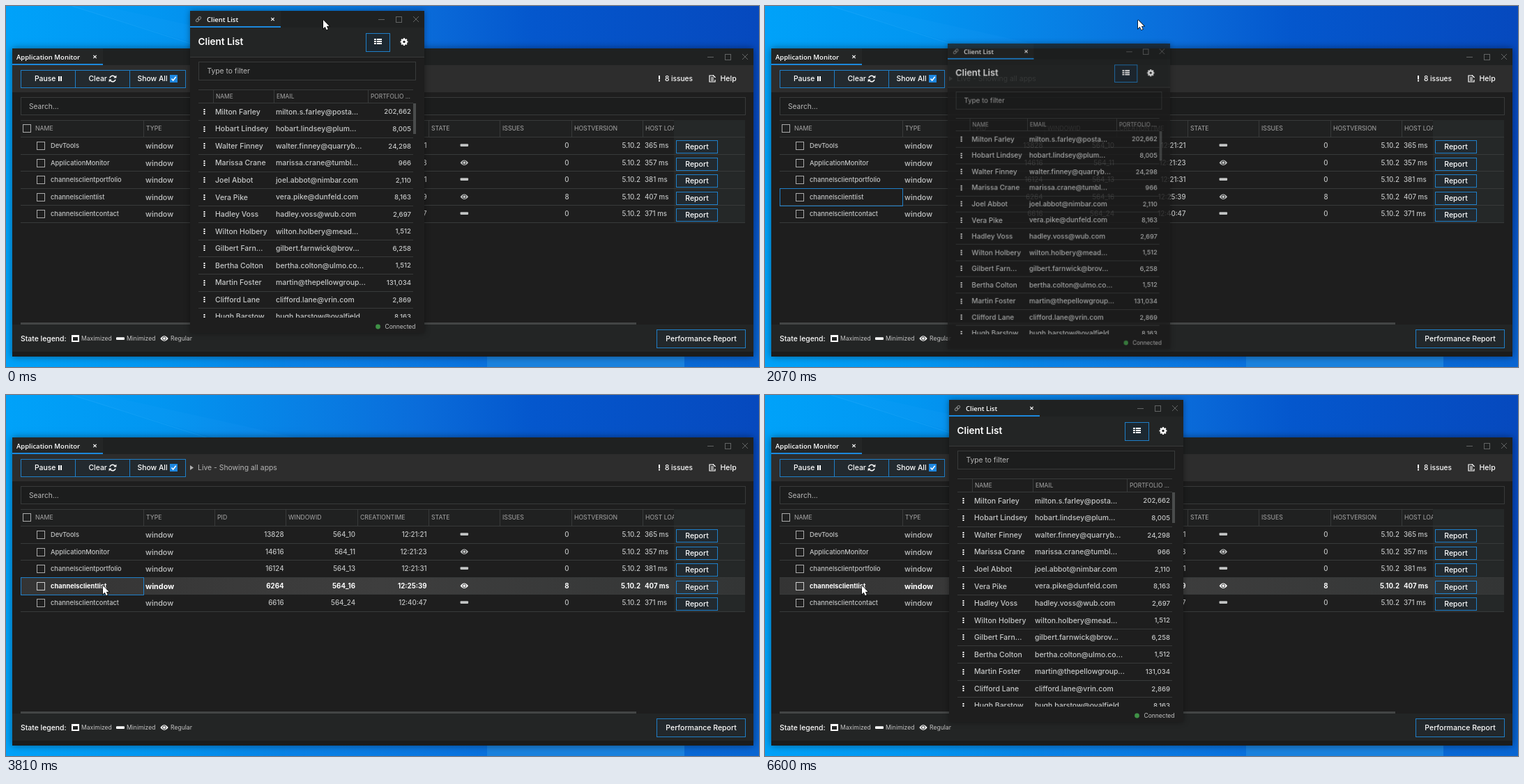
These frames come from a looping animation (1080x519 px, 7 s). An HTML page with a canvas:

```html
<!DOCTYPE html>
<html lang="en">
<head>
<meta charset="utf-8">
<title>Application Monitor</title>
<style>
  html, body { margin: 0; height: 100%; overflow: hidden; background: #0878dc; }
  canvas { display: block; }
</style>
</head>
<body>
<canvas id="stage" width="1080" height="519"></canvas>
<script>
const W = 1080, H = 519, LOOP = 7000;
const BLUE = '#1f7fc8', LINE = '#383a3a', BODY = '#1e1e1e', BAR = '#232525';
const UI = 'Inter, sans-serif', TAB = '"Open Sans", sans-serif';
const stage = document.getElementById('stage').getContext('2d');
let g = stage;

const clamp = v => Math.max(0, Math.min(1, v));

// ---- drawing helpers ----
function fill(x, y, w, h, color) {
  g.fillStyle = color;
  g.fillRect(x, y, w, h);
}
function box(x, y, w, h, color, bg) {
  if (bg) fill(x, y, w, h, bg);
  g.strokeStyle = color;
  g.lineWidth = 1;
  g.strokeRect(x + .5, y + .5, w - 1, h - 1);
}
function text(s, x, y, size, color = '#fff', weight = 400, align = 'left', family = UI) {
  g.font = `${weight} ${size}px ${family}`;
  g.textAlign = align;
  g.fillStyle = color;
  g.fillText(s, x, y + size * .36);
}
function path(points, color, width) {
  g.beginPath();
  points.forEach(([x, y]) => g.lineTo(x, y));
  if (width) {
    g.strokeStyle = color;
    g.lineWidth = width;
    g.stroke();
  } else {
    g.closePath();
    g.fillStyle = color;
    g.fill();
  }
}
function disc(x, y, r, color) {
  g.beginPath();
  g.arc(x, y, r, 0, 7);
  g.fillStyle = color;
  g.fill();
}
function arc(x, y, r, from, to, color, width) {
  g.beginPath();
  g.arc(x, y, r, from, to);
  g.strokeStyle = color;
  g.lineWidth = width;
  g.stroke();
}
function cross(x, y, r, color, width = 1) {
  path([[x - r, y - r], [x + r, y + r]], color, width);
  path([[x + r, y - r], [x - r, y + r]], color, width);
}
function pill(x, y, w, color) {
  g.beginPath();
  g.roundRect(x - w / 2, y - 1.7, w, 3.6, 1);
  g.fillStyle = color;
  g.fill();
}
function eye(x, y, color, pupil) {
  g.beginPath();
  g.moveTo(x - 5.7, y);
  g.quadraticCurveTo(x, y - 7.6, x + 5.7, y);
  g.quadraticCurveTo(x, y + 7.6, x - 5.7, y);
  g.fillStyle = color;
  g.fill();
  arc(x, y, 2.4, 0, 7, pupil, 1);
}
function layer(w, h, draw) {
  const c = document.createElement('canvas');
  c.width = w;
  c.height = h;
  g = c.getContext('2d');
  draw();
  g = stage;
  return c;
}
function titleBar(x, y, w, tabWidth, label, labelX) {
  fill(x, y, w, 24, '#1f2121');
  fill(x, y, tabWidth, 22, '#242626');
  fill(x, y + 22, tabWidth, 2, '#1c88dc');
  text(label, labelX, y + 12.5, 9.5, '#fff', 600, 'left', TAB);
  cross(x + tabWidth - 11.5, y + 12, 2.2, '#fff', 1.1);
  const r = x + w;
  fill(r - 66, y + 12, 9, 1, '#626464');
  box(r - 41, y + 8, 9, 9, '#626464');
  cross(r - 12, y + 12, 4, '#626464');
}

// ---- desktop ----
function drawDesktop() {
  const sky = g.createLinearGradient(0, 0, W, 0);
  [[0, '#00a2f9'], [.2, '#0296f1'], [.4, '#087fe4'], [.55, '#0a6cda'], [.7, '#0457cd'], [1, '#0649be']]
    .forEach(([at, c]) => sky.addColorStop(at, c));
  fill(0, 0, W, H, sky);
  path([[90, 0], [140, 0], [420, 62], [300, 62]], 'rgba(60,170,255,.07)');
  path([[95, 0], [290, 62]], 'rgba(90,190,255,.16)', 1);
  const glow = g.createLinearGradient(0, 200, 0, H);
  glow.addColorStop(0, 'rgba(10,130,232,0)');
  glow.addColorStop(1, 'rgba(10,130,232,.5)');
  fill(400, 200, W - 400, H - 200, glow);
  fill(690, 490, 283, 29, '#1a82de');
}

// ---- monitor window ----
const dividers = [197, 299, 401, 504, 606, 708, 811, 913];
const heads = ['TYPE', 'PID', 'WINDOWID', 'CREATIONTIME', 'STATE', 'ISSUES', 'HOSTVERSION', 'HOST LOA'];
const apps = [
  ['DevTools', '13828', '564_10', '12:21:21', 0, '365 ms'],
  ['ApplicationMonitor', '14616', '564_11', '12:21:23', 0, '357 ms'],
  ['channelsclientportfolio', '16124', '564_13', '12:21:31', 0, '381 ms'],
  ['channelsclientlist', '6264', '564_16', '12:25:39', 8, '407 ms'],
  ['channelsclientcontact', '6616', '564_24', '12:40:47', 0, '371 ms']
];
const TOP = 188, STEP = 24.6;

function drawMonitor() {
  g.shadowColor = 'rgba(0,0,0,.45)';
  g.shadowBlur = 10;
  fill(9, 61, 1063, 443, BODY);
  g.shadowBlur = 0;
  titleBar(9, 61, 1063, 130, 'Application Monitor', 15);

  fill(9, 85, 1063, 39, '#2d2d2d');
  box(21, 92, 237, 26, BLUE, '#232a2f');
  fill(99, 92, 1, 26, BLUE);
  fill(177, 92, 1, 26, BLUE);
  text('Pause', 41, 104.5, 10.4, '#fff', 500);
  fill(75, 101, 2, 7, '#fff');
  fill(78, 101, 2, 7, '#fff');
  text('Clear', 118.5, 104.5, 10.4, '#fff', 500);
  arc(153, 104.5, 4.2, 3.4, 5.9, '#fff', 1.5);
  arc(153, 104.5, 4.2, .3, 2.8, '#fff', 1.5);
  path([[158.4, 99.5], [158.4, 103.6], [154.4, 103.6]], '#fff');
  path([[147.6, 109.5], [147.6, 105.4], [151.6, 105.4]], '#fff');
  text('Show All', 188.5, 104.5, 10.4, '#fff', 500);
  fill(235, 99, 11, 11, '#1d86df');
  path([[237.5, 104.5], [239.7, 107], [243.7, 101.8]], '#fff', 1.5);
  path([[264, 101], [269, 104.5], [264, 108]], '#b0b0b0');
  text('Live - Showing all apps', 275, 104.5, 10.4, '#b5b5b5');
  fill(936, 100, 2, 5.5, '#fff');
  fill(936, 106.5, 2, 2, '#fff');
  text('8 issues', 945, 104.5, 10.1, '#fff', 500);
  path([[1015, 100], [1009, 100], [1009, 109], [1017, 109], [1017, 106]], '#fff', 1.2);
  path([[1014, 99.5], [1017.5, 103]], '#fff', 1.2);
  [102.5, 104.5, 106.5].forEach(y => fill(1011, y, 4, 1, '#fff'));
  text('Help', 1024.5, 104.5, 10.5, '#fff', 500);

  box(21, 131, 1040, 26, LINE, '#1c1d1d');
  text('Search...', 33, 144.5, 10.2, '#b8b8b8');

  fill(21, 164, 1039, 1, LINE);
  fill(21, 165, 1039, 23, '#202121');
  box(24, 170, 12, 12, '#aaa');
  text('NAME', 42, 175.5, 8.7, '#a8a8a8');
  dividers.forEach((x, i) => {
    fill(x, 165, 1, 23, LINE);
    text(heads[i], x + 4, 175.5, 8.7, '#a8a8a8');
  });
  fill(958, 164, 102, 148, '#252828');

  fill(21, 455, 883, 3, '#434545');
  fill(9, 458, 1063, 39, BAR);
  fill(9, 497, 1063, 7, '#1b1c1c');
  text('State legend:', 21, 478, 10.4, '#fff', 500);
  box(94, 473, 11, 10, '#fff');
  g.lineWidth = 2;
  g.strokeRect(95, 474, 9, 8);
  fill(94, 473, 11, 3, '#fff');
  text('Maximized', 108, 478, 8.6, '#c4c4c4');
  pill(164, 478, 12, '#fff');
  text('Minimized', 173, 478, 8.6, '#c4c4c4');
  eye(227, 478, '#fff', BAR);
  text('Regular', 236, 478, 8.6, '#c4c4c4');
  box(933, 465, 128, 27, BLUE, '#22282c');
  text('Performance Report', 997, 478, 10.5, '#fff', 500, 'center');
}

function drawRows(t, hovered) {
  apps.forEach(([name, pid, id, time, issues, load], i) => {
    const y = Math.round(TOP + i * STEP), mid = y + 13, hot = i === hovered;
    const color = hot ? '#fff' : '#c2c4c4', weight = hot ? 700 : 500;
    if (hot) {
      const glow = g.createLinearGradient(21, 0, 1060, 0);
      glow.addColorStop(0, '#343434');
      glow.addColorStop(.5, '#3e3e3e');
      glow.addColorStop(1, '#333535');
      fill(21, y, 1039, 25, glow);
    }
    box(44, mid - 6, 12, 12, hot ? '#ccc' : '#aaa');
    text(name, 64, mid - .5, 9.3, color, weight);
    text('window', 200, mid, 10.8, color, weight);
    const right = (s, x) => text(s, x, mid, 9.7, color, weight, 'right');
    right(pid, 398.5);
    right(id, 501);
    right(time, 603.5);
    right(issues, 807.5);
    right('5.10.2', 910);
    text(load, 916, mid, 9.7, color, weight);
    const regular = i === 1 || i === 3 && (t < 4140 || t >= 6600);
    if (regular) eye(657.3, mid - .7, color, hot ? '#333' : BODY);
    else pill(657.3, mid - 1, 11.5, color);
    fill(21, y, 1039, 1, LINE);
    box(961, y + 5, 60, 19, BLUE, hot ? '#2b343a' : '#222a30');
    text('Report', 991, mid + 1, 10.5, '#fff', 500, 'center');
  });
  fill(21, 311, 1039, 1, LINE);
  if (t >= 2050 && t < 4600) box(21, 262, 177, 26, BLUE);

  const tint = clamp((t - 4440) / 120) * clamp((4850 - t) / 60);
  if (tint > 0) {
    const shade = `rgba(40,120,200,${.4 * tint})`;
    fill(25, 171, 10, 10, shade);
    fill(45, 270, 10, 10, shade);
    fill(962, 268, 58, 17, shade);
  }
}

// ---- client list window ----
const clients = [
  ['Milton Farley', 'milton.s.farley@posta...', '202,662'],
  ['Hobart Lindsey', 'hobart.lindsey@plum...', '8,005'],
  ['Walter Finney', 'walter.finney@quarryb...', '24,298'],
  ['Marissa Crane', 'marissa.crane@tumbl...', '966'],
  ['Joel Abbot', 'joel.abbot@nimbar.com', '2,110'],
  ['Vera Pike', 'vera.pike@dunfeld.com', '8,163'],
  ['Hadley Voss', 'hadley.voss@wub.com', '2,697'],
  ['Wilton Holbery', 'wilton.holbery@mead...', '1,512'],
  ['Gilbert Farn...', 'gilbert.farnwick@brov...', '6,258'],
  ['Bertha Colton', 'bertha.colton@ulmo.co...', '1,512'],
  ['Martin Foster', 'martin@thepellowgroup...', '131,034'],
  ['Clifford Lane', 'clifford.lane@vrin.com', '2,869'],
  ['Hugh Barstow', 'hugh.barstow@ovalfield', '8,163']
];
const CX = 264, CY = 7, CW = 336, CH = 463;

function drawClients() {
  g.translate(-CX, -CY);
  fill(CX, CY, CW, CH, BODY);
  titleBar(CX, CY, CW, 130, 'Client List', 288);
  g.save();
  g.translate(276, 19);
  g.rotate(-Math.PI / 4);
  g.strokeStyle = '#8a8c8c';
  g.lineWidth = 1;
  [-4.5, -.5].forEach(x => {
    g.beginPath();
    g.roundRect(x, -1.7, 5, 3.4, 1.7);
    g.stroke();
  });
  g.restore();

  fill(CX, 31, CW, 42, BAR);
  fill(CX, 73, CW, 1, LINE);
  text('Client List', 275.5, 51, 13.5, '#fff', 600);
  box(516, 39, 35, 27, BLUE, '#1c2831');
  [48, 51, 54].forEach(y => {
    fill(528, y - 1, 3, 2, '#fff');
    fill(532, y - 1, 7, 2, '#fff');
  });
  for (let i = 0; i < 8; i++) {
    const a = i * Math.PI / 4;
    path([[571, 51.5], [571 + 5.4 * Math.cos(a), 51.5 + 5.4 * Math.sin(a)]], '#fff', 2.2);
  }
  disc(571, 51.5, 4.1, '#fff');
  disc(571, 51.5, 1.7, BAR);

  box(276, 80, 312, 27, LINE, '#1c1d1d');
  text('Type to filter', 288.5, 93.5, 10.3, '#b8b8b8');
  fill(276, 120, 308, 1, LINE);
  fill(276, 139, 308, 1, LINE);
  [[297, 'NAME'], [384, 'EMAIL'], [519, 'PORTFOLIO ...']].forEach(([x, s]) => {
    fill(x, 121, 1, 18, LINE);
    text(s, x + 4, 130, 8.4, '#a8a8a8');
  });

  g.save();
  g.beginPath();
  g.rect(CX, 139, CW, 309);
  g.clip();
  clients.forEach(([name, email, value], i) => {
    const y = 152 + i * 24.55;
    [-3, 0, 3].forEach(d => fill(283.5, Math.round(y) + d - 1, 2, 2, '#fff'));
    text(name, 300, y, 10.5, '#c6c8c8', 500);
    text(email, 387, y, 10.4, '#c6c8c8', 500);
    text(value, 581, y, 9.6, '#c6c8c8', 500, 'right');
    fill(276, Math.round(y + 12), 308, 1, LINE);
  });
  g.restore();
  fill(584, 140, 4, 44, '#4a4c4c');
  disc(533.5, 461, 3.4, '#3f9146');
  text('Connected', 587.5, 461, 8.5, '#c4c4c4', 400, 'right');
}

// 0 = fully open, 1 = collapsed towards the taskbar
function collapse(t) {
  if (t < 1990) return 0;
  if (t < 2250) return ((t - 1990) / 260) ** 1.5;
  if (t < 4620) return 1;
  return (1 - clamp((t - 4620) / 240)) ** 3.4;
}
function drawClientWindow(t) {
  const q = collapse(t);
  if (q >= 1) return;
  const scale = 1 - .3 * q;
  g.save();
  g.globalAlpha = (1 - q) ** 1.2;
  g.shadowColor = 'rgba(0,0,0,.4)';
  g.shadowBlur = 9 * (1 - q);
  g.drawImage(clientLayer, CX - 10 * q, CY + 270 * q, CW * scale, CH * scale);
  g.restore();
  if (t >= 1440 && t < 1990) fill(534, 19, 9, 1, '#d0d0d0');
}

// ---- pointer: time, x, y ----
const track = [
  [0, 455, 20], [780, 455, 20], [1000, 471, 21], [1260, 512, 24], [1480, 531, 25],
  [1510, 531, 25], [1600, 526, 17], [1730, 536, 10], [1850, 535, 20], [2690, 535, 20],
  [2850, 495, 40], [3050, 370, 100], [3230, 245, 160], [3410, 185, 192],
  [3600, 150, 245], [3810, 139, 274], [7000, 139, 274]
];
function pointer(t) {
  const i = track.findIndex(k => k[0] > t);
  const [t0, x0, y0] = track[i - 1], [t1, x1, y1] = track[i];
  const u = (t - t0) / (t1 - t0);
  return [x0 + (x1 - x0) * u, y0 + (y1 - y0) * u];
}
function drawPointer(x, y) {
  g.save();
  g.translate(x, y);
  const arrow = [[0, 0], [0, 12.3], [2.7, 9.8], [4.7, 14.2], [6.8, 13.3], [4.9, 9], [8.6, 8.7], [0, 0]];
  path(arrow, '#000', 1.4);
  path(arrow, '#fff');
  g.restore();
}

const backLayer = layer(W, H, () => { drawDesktop(); drawMonitor(); });
const clientLayer = layer(CW, CH, drawClients);

function frame(now) {
  const t = now % LOOP;
  const [x, y] = pointer(t);
  const row = t > 2690 && y >= TOP ? Math.floor((y - TOP) / STEP) : -1;
  g.drawImage(backLayer, 0, 0);
  drawRows(t, row);
  drawClientWindow(t);
  drawPointer(x, y);
}
const start = performance.now();
function tick() {
  frame(performance.now() - start);
  requestAnimationFrame(tick);
}
tick();
</script>
</body>
</html>
```
